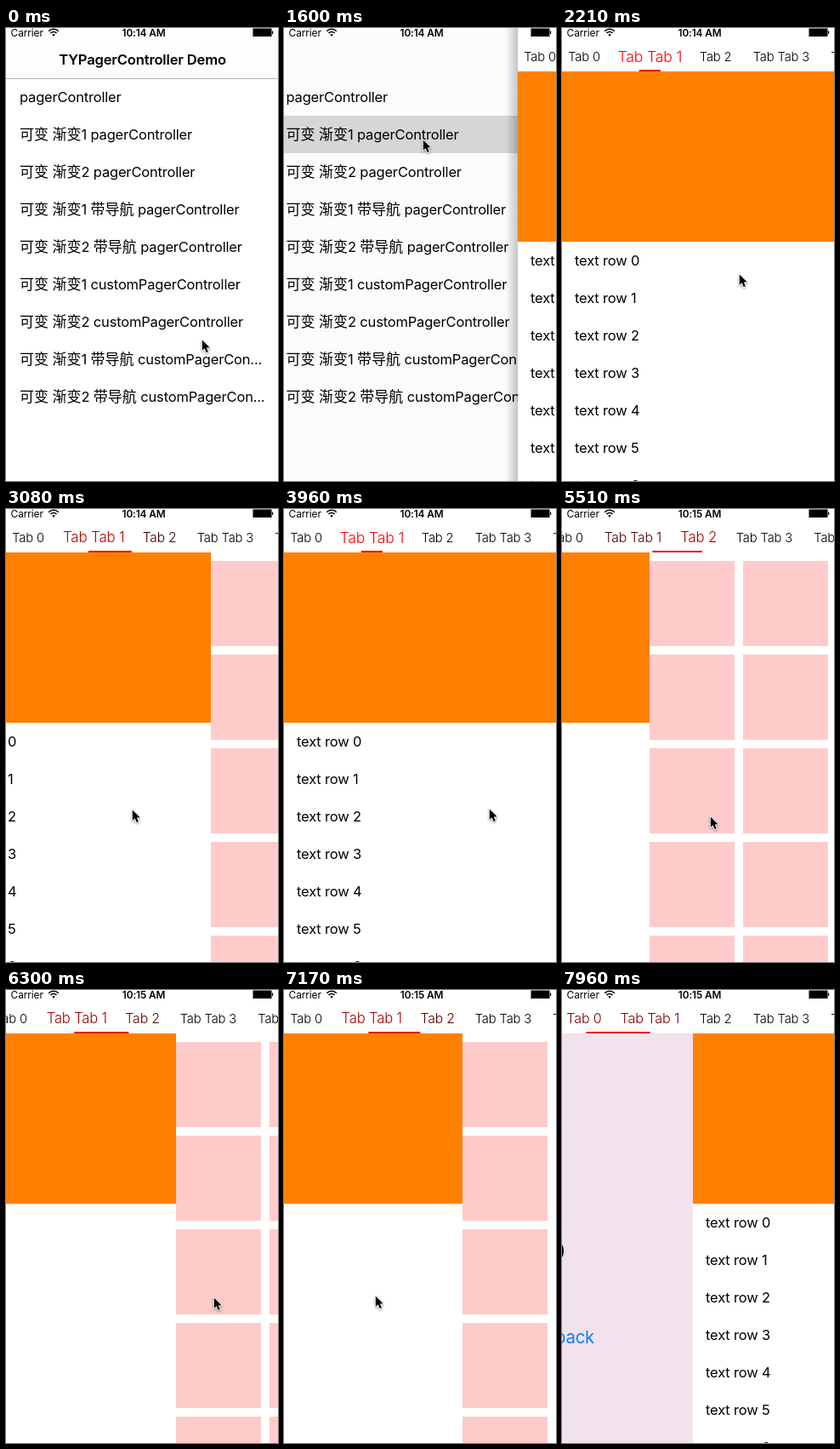
An HTML page with a canvas that plays this animation: 320 px wide and 532 px high, repeating every 8 s.

```html
<!DOCTYPE html>
<html lang="zh">
<head>
<meta charset="utf-8">
<title>TYPagerController Demo</title>
<style>
html, body { margin: 0; width: 100%; height: 100%; overflow: hidden; background: #fff; }
canvas { display: block; width: 320px; height: 532px; }
</style>
</head>
<body>
<canvas id="stage"></canvas>
<script>
const W = 320, H = 532, LOOP = 8000, STEP = 87;
const PUSH = 1600, CLOCK = 4500;
const canvas = document.getElementById('stage');
const ctx = canvas.getContext('2d');
const dpr = window.devicePixelRatio || 1;
canvas.width = W * dpr;
canvas.height = H * dpr;

const FONT = 'Inter, "Noto Sans CJK SC", "Noto Sans CJK", sans-serif';
const MENU = [
  'pagerController',
  '可变 渐变1 pagerController',
  '可变 渐变2 pagerController',
  '可变 渐变1 带导航 pagerController',
  '可变 渐变2 带导航 pagerController',
  '可变 渐变1 customPagerController',
  '可变 渐变2 customPagerController',
  '可变 渐变1 带导航 customPagerCon...',
  '可变 渐变2 带导航 customPagerCon...'
];

const mix = (a, b, p) => a + (b - a) * p;
const clamp = v => Math.min(1, Math.max(0, v));
const ease = (t, from, to) => {
  const u = clamp((t - from) / (to - from));
  return u * u * (3 - 2 * u);
};
const tabX = i => 26 + 77.3 * i;

// Eased moves of the pager: start, end, offset reached
const GLIDES = [
  [2380, 3430, 427], [3430, 3900, W], [4050, 4967, 2 * W], [5080, 5862, 464],
  [6210, 6550, W], [6690, 7230, 434], [7430, 7951, 166]
];
const scrollAt = t => GLIDES.reduce((v, [from, to, goal]) => mix(v, goal, ease(t, from, to)), W);
const barAt = t => 20 * (ease(t, 4820, 5060) - ease(t, 6300, 6560));

// While held, the pointer moves opposite to the scroll: x = grab - scroll
const DRAGS = [
  { down: 2380, up: 3900, grab: 547, y: 353 },
  { down: 4050, up: 4800, grab: 604, y: 349 },
  { down: 5080, up: 6210, grab: 711, y: 361 },
  { down: 6690, up: LOOP, grab: 537, y: 359 }
];

function pointerAt(t) {
  const tap = ease(t, 350, 1140);
  let x = mix(230, 163, tap), y = mix(366, 131, tap), free = 1900;
  for (const d of DRAGS) {
    if (t < free) break;
    const go = ease(t, free, d.down);
    const held = Math.min(Math.max(t, d.down), d.up);
    x = mix(x, d.grab - scrollAt(held), go);
    y = mix(y, d.y, go);
    free = d.up;
  }
  return [x, y];
}

function rect(x, y, w, h, color) {
  ctx.fillStyle = color;
  ctx.fillRect(x, y, w, h);
}

function text(str, x, y, size, { color = '#000', weight = 400, align = 0 } = {}) {
  const runs = str.split(/([\u4e00-\u9fff]+)/).filter(Boolean).map(s => {
    const cjk = s.charCodeAt(0) > 0x4dff;
    return { s, font: `${weight} ${cjk ? size : size * 0.97}px ${FONT}`, gap: cjk ? 0 : -0.01 * size };
  });
  const use = r => {
    ctx.font = r.font;
    ctx.letterSpacing = r.gap + 'px';
    return ctx.measureText(r.s).width;
  };
  ctx.fillStyle = color;
  x -= runs.reduce((sum, r) => sum + use(r), 0) * align;
  for (const r of runs) {
    const w = use(r);
    ctx.fillText(r.s, x, y);
    x += w;
  }
}

function statusBar(t) {
  text('Carrier', 5.6, 9.6, 12.3);
  ctx.strokeStyle = ctx.fillStyle = '#000';
  ctx.lineWidth = 1.6;
  for (const r of [5, 8.2]) {
    ctx.beginPath();
    ctx.arc(56, 9.5, r, -Math.PI * 0.75, -Math.PI * 0.25);
    ctx.stroke();
  }
  ctx.beginPath();
  ctx.moveTo(56, 10);
  ctx.arc(56, 9.5, 2.4, -Math.PI * 0.75, -Math.PI * 0.25);
  ctx.fill();
  text(t < CLOCK ? '10:14 AM' : '10:15 AM', 162, 9.6, 12.2, { weight: 600, align: 0.5 });
  rect(290.5, 0.5, 22, 9.5, '#000');
  rect(313, 3.5, 1.2, 3.5, '#000');
}

function menu(shift, pushed) {
  rect(0, 0, W, H, '#fff');
  if (pushed) {
    rect(0, 103, W, 44, '#d9d9d9');
  } else {
    rect(0, 0, W, 59, '#fdfdfd');
    rect(0, 59, W, 1, '#b4b4b4');
    text('TYPagerController Demo', 160.5, 43, 17.1, { weight: 600, align: 0.5 });
  }
  MENU.forEach((s, i) => text(s, 16 + shift, 87 + 44 * i, 17));
}

function backPage(x) {
  rect(x, 51, W, H - 51, '#f1e2eb');
  text('0', x + 160, 317, 30, { weight: 500, align: 0.5 });
  text('pop back', x + 160, 415, 21, { color: '#0a7dff', align: 0.5 });
}

function listPage(x) {
  rect(x, 51, W, H - 51, '#fff');
  rect(x, 51, W, 200, '#ff8000');
  for (let i = 0; i < 7; i++) text('text row ' + i, x + 15, 279 + 44 * i, 17);
}

function gridPage(x) {
  rect(x, 51, W, H - 51, '#fff');
  for (let r = 0; r < 5; r++)
    for (let c = 0; c < 3; c++) rect(x + 110 * c, 61 + 110 * r, 100, 100, '#ffcaca');
}

function tabBar(pos, shift) {
  rect(0, 0, W, 51, '#fff');
  for (let i = 0; i < 5; i++) {
    const on = clamp(1 - Math.abs(pos - i));
    text((i % 2 ? 'Tab Tab ' : 'Tab ') + i, tabX(i) - shift, 38.7 + 0.8 * on, mix(15.2, 18.2, on), {
      color: `rgb(${Math.round(255 * on)},0,0)`, weight: 300, align: 0.5
    });
  }
  // Elastic underline: each end passes a tab centre halfway
  const i = Math.floor(pos), p = pos - i, half = 12.5;
  const a = tabX(i), b = tabX(i + 1);
  const left = p < 0.5 ? mix(a - half, a, p * 2) : mix(a, b - half, p * 2 - 1);
  const right = p < 0.5 ? mix(a + half, b, p * 2) : mix(b, b + half, p * 2 - 1);
  rect(left - shift, 49, right - left, 2, '#f00000');
}

function pager(t) {
  const scroll = Math.round(scrollAt(t));
  ctx.save();
  ctx.beginPath();
  ctx.rect(0, 0, W, H);
  ctx.clip();
  [backPage, listPage, gridPage].forEach((draw, i) => {
    const x = i * W - scroll;
    if (Math.abs(x) < W) draw(x);
  });
  tabBar(scroll / W, Math.round(barAt(t)));
  ctx.restore();
}

function pointer(x, y) {
  const arrow = [[0, 0], [0, 14], [3.2, 11.2], [5.6, 16.6], [8, 15.6], [5.7, 10.3], [10, 10]];
  ctx.save();
  ctx.translate(Math.round(x) + 0.8, Math.round(y) + 0.5);
  ctx.scale(0.88, 0.88);
  ctx.beginPath();
  arrow.forEach(p => ctx.lineTo(...p));
  ctx.closePath();
  ctx.lineJoin = 'round';
  ctx.lineWidth = 2;
  ctx.strokeStyle = '#fff';
  ctx.shadowColor = 'rgba(0,0,0,.45)';
  ctx.shadowBlur = 2.5 * dpr;
  ctx.shadowOffsetY = dpr;
  ctx.stroke();
  ctx.shadowColor = 'transparent';
  ctx.fillStyle = '#000';
  ctx.fill();
  ctx.restore();
}

function snap(t) {
  return t < 1500
    ? 350 + 88 * Math.floor((t - 345) / 88)
    : PUSH + STEP * Math.floor((t - PUSH + 8) / STEP);
}

function draw(now) {
  const t = snap(now % LOOP);
  ctx.setTransform(dpr, 0, 0, dpr, 0, 0);
  if (t < PUSH) {
    menu(0, false);
  } else {
    // Critically damped spring
    const u = 0.66 + (t - PUSH) * 0.018;
    const x = Math.round(W * (1 + u) * Math.exp(-u));
    if (x > 0) {
      menu(-0.3 * (W - x), true);
      rect(0, 0, W, H, `rgba(0,0,0,${0.1 * (1 - x / W)})`);
      const shade = ctx.createLinearGradient(x - 14, 0, x, 0);
      shade.addColorStop(0, 'rgba(0,0,0,0)');
      shade.addColorStop(1, 'rgba(0,0,0,.22)');
      rect(x - 14, 0, 14, H, shade);
    }
    ctx.save();
    ctx.translate(x, 0);
    pager(t);
    ctx.restore();
  }
  statusBar(t);
  pointer(...pointerAt(t));
}

const start = performance.now();
function tick() {
  draw(performance.now() - start);
  requestAnimationFrame(tick);
}
tick();
</script>
</body>
</html>
```
